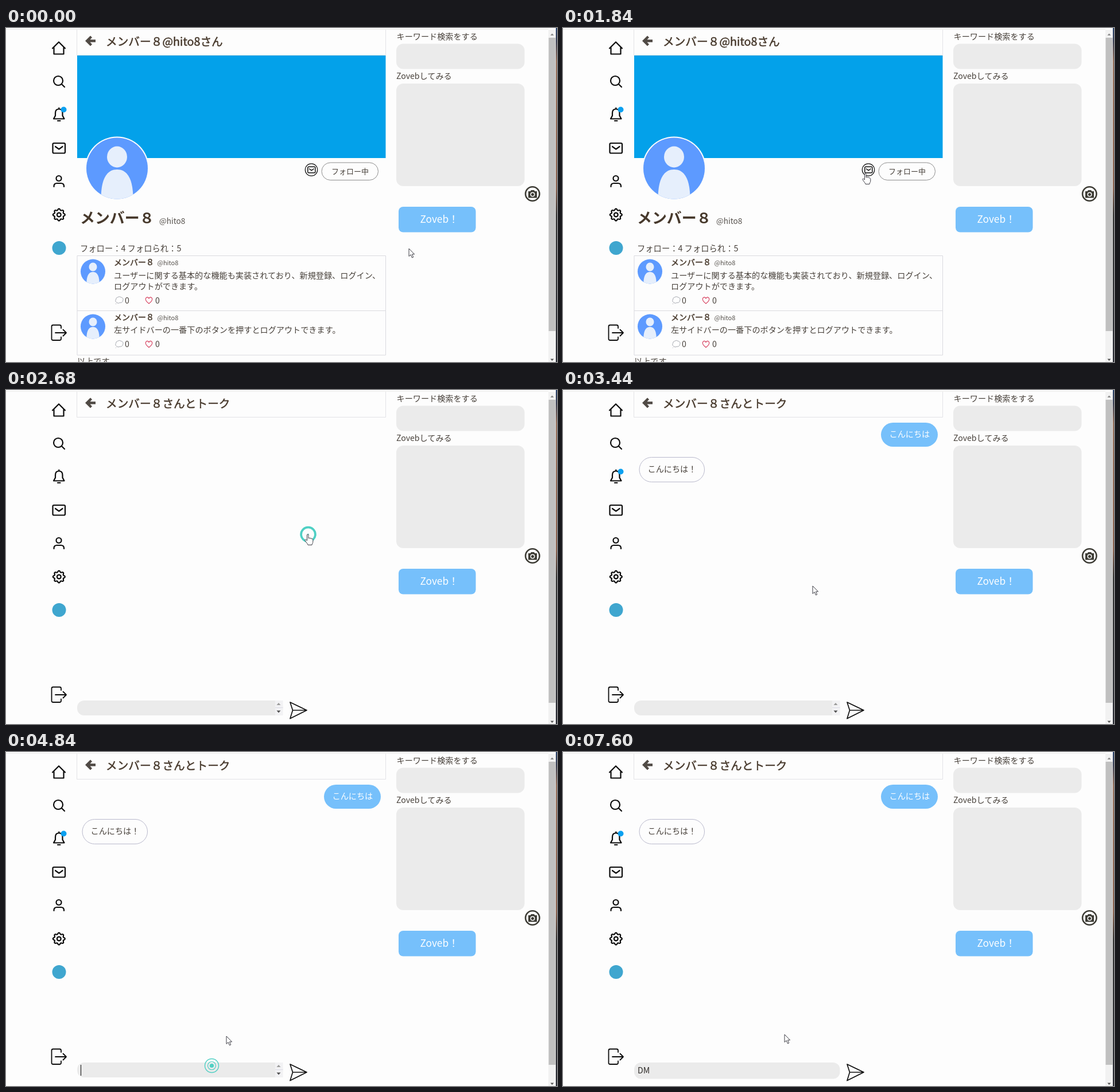
An HTML page for the animation above (8000 ms loop, 960x583 px).

```html
<!DOCTYPE html>
<html lang="ja">
<head>
<meta charset="utf-8">
<title>トーク</title>
<style>
html, body { margin: 0; width: 100%; height: 100%; overflow: hidden; background: #fdfdfd; }
svg { display: block; width: 100vw; height: 100vh; }
text { font-family: "Noto Sans CJK JP", "Noto Sans CJK", sans-serif; font-size: 14.15px; fill: #47403a; white-space: pre; }
.semi { fill: #47392c; stroke: #47392c; stroke-width: .5; }
.handle { fill: #55504b; }
.icon { fill: none; stroke: #0b0b0b; stroke-width: 2.2; stroke-linejoin: round; stroke-linecap: round; }
.thin { fill: none; stroke: #111; stroke-width: 1.5; stroke-linejoin: round; }
.line { fill: none; stroke: #dadadf; }
.field { fill: #ebebeb; }
</style>
</head>
<body>
<svg viewBox="0 0 960 583" preserveAspectRatio="none">
  <defs>
    <linearGradient id="edge" x2="0" y2="1">
      <stop offset="0" stop-color="#27416b"/><stop offset=".04" stop-color="#3a3f52"/>
      <stop offset=".1" stop-color="#96705c"/><stop offset=".48" stop-color="#8a6250"/>
      <stop offset=".56" stop-color="#333"/><stop offset="1" stop-color="#292b33"/>
    </linearGradient>
    <clipPath id="round"><circle r="53.5"/></clipPath>
    <g id="avatar">
      <circle r="53.5" fill="#5d9aff"/>
      <g fill="#e6effc" clip-path="url(#round)">
        <ellipse cy="-20" rx="17.5" ry="18.5"/>
        <path d="M-28 54C-28 24-21 2 0 2S28 24 28 54Z"/>
      </g>
    </g>
    <g id="counts">
      <path d="M4 4.500a4 4 0 0 1 3-4a5 5 0 0 1 6 0a4 4 0 0 1 3 6a4 4 0 0 1-5 3.500a5 5 0 0 1-6-.5a3.500 3.500 0 0 1-1-5ZM4.500 11.500l-1 1" fill="#fff" stroke="#a3a6ad" transform="translate(-1.500)"/>
      <text x="18" y="11">0</text>
      <path d="M60 11.500C54 7 54 4 54.500 2.500C55.500-.5 59-.2 60 2.500C61-.2 64.500-.5 65.500 2.500C66 4 66 7 60 11.500Z" fill="none" stroke="#d63d5c" stroke-width="1.100"/>
      <text x="71" y="11">0</text>
    </g>
  </defs>

  <rect width="960" height="583" fill="#fdfdfd"/>
  <path d="M0 2.500H945" stroke="#ececea"/>

  <g class="icon">
    <path d="M81 35.500L92 24.500L103 35.500M83.500 34V45.500H100.500V34"/>
    <circle cx="91" cy="92" r="8"/><path d="M97 98l5 5"/>
    <path d="M83 158.500H101.500L98.500 153V148.500C98.500 144 96 141.500 92.300 141.500S86 144 86 148.500V153ZM92.300 141V139.500M90 162h4.500"/>
    <rect x="81.500" y="201" width="21.500" height="17.500" rx="2"/><path d="M86 207l6.300 4.500L98.500 207"/>
    <circle cx="92" cy="262.500" r="4.500"/><path d="M83.500 277V276C83.500 272.500 86 271 89 271H95.500C98.500 271 101 272.500 101 276V277"/>
    <path id="gear" transform="translate(92.300 326)"/><circle cx="92.300" cy="326" r="3.400"/>
    <path stroke-width="1.800" d="M96 524V521a2.500 2.500 0 0 0-2.500-2.500H82a2.500 2.500 0 0 0-2.500 2.500V542.500a2.500 2.500 0 0 0 2.500 2.500H93.500a2.500 2.500 0 0 0 2.500-2.500V539.500M86 532H105M99.500 526.500L105 532L99.500 537.500"/>
  </g>
  <circle cx="92.500" cy="384" r="12" fill="#3fa6cf"/>
  <circle id="dot" cx="100.500" cy="142.500" r="5" fill="#0aa0f0"/>

  <path class="line" stroke-opacity=".75" d="M123.500 3V47.500H661.500V3"/>
  <path d="M138 22.500L147 13.500L150 16.500L146.500 20.200H156V24.800H146.500L150 28.500L147 31.500Z" fill="#504a45"/>

  <g id="profile">
    <text class="semi" x="174" y="31" font-size="19.700" style="font-size:19.7px">メンバー８@hito8さん</text>
    <rect x="124" y="48" width="537.500" height="179" fill="#03a1ea"/>
    <circle cx="193.500" cy="245" r="55.500" fill="#fdfdfd"/>
    <use href="#avatar" x="193.500" y="245"/>
    <circle class="thin" cx="532" cy="247.500" r="10.700" style="stroke-width:1.2"/>
    <rect class="thin" x="525.800" y="242.300" width="13" height="10.400" rx="1.500"/>
    <path class="thin" d="M528 245.500l4.300 3.200 4.300-3.200"/>
    <rect x="550" y="235" width="98.500" height="30.500" rx="15.200" fill="#fdfdfd" stroke="#8d8d8d"/>
    <text x="567" y="255" style="font-size:13px">フォロー中</text>
    <text class="semi" x="129" y="341" style="font-size:25.900px;font-weight:bold;stroke:none">メンバー８</text>
    <text class="handle" x="267" y="342" style="font-size:13.500px">@hito8</text>
    <text x="129" y="390" style="font-size:14.300px">フォロー：4 フォロられ：5</text>
    <path class="line" d="M124 397.500H661.500V571H124ZM124 493.500H661.500"/>
    <g id="posts"></g>
    <text x="124" y="587">以上です</text>
  </g>

  <g id="chat">
    <text class="semi" x="174" y="31" style="font-size:19.700px">メンバー８さんとトーク</text>
    <g id="messages">
      <rect x="554" y="57" width="99" height="42" rx="21" fill="#76c0fb"/>
      <text x="568.500" y="82" style="fill:#fff">こんにちは</text>
      <rect x="133" y="117.500" width="113.500" height="43" rx="21.500" fill="#fdfdfd" stroke="#b9b9cc"/>
      <text x="147.500" y="143">こんにちは！</text>
    </g>
    <rect id="input" class="field" x="124" y="542" width="358.500" height="26" rx="12"/>
    <g id="spin">
      <rect x="469" y="542" width="13.500" height="26" fill="#f2f2f4"/>
      <path d="M469 554.500h13.500" stroke="#dcdce6"/>
      <path d="M471.500 550h7l-3.500-4Z" fill="#9a9a9a"/><path d="M471.500 559.500h7l-3.500 4Z" fill="#505050"/>
    </g>
    <text id="typed" x="130" y="560.500" style="fill:#2c2926"></text>
    <path id="caret" d="M0 546V565" stroke="#222" stroke-width="1.200"/>
    <path class="thin" d="M495 545L524 559L495 573.500L499.500 559ZM499.500 559H524" style="stroke-width:1.7"/>
  </g>

  <text x="680.500" y="19.500">キーワード検索をする</text>
  <rect class="field" x="680" y="27.500" width="223.500" height="44" rx="12"/>
  <text x="680" y="89">Zovebしてみる</text>
  <rect class="field" x="680" y="97" width="223.500" height="179" rx="12"/>
  <circle cx="917.300" cy="289.500" r="12.200" fill="none" stroke="#3d3c35" stroke-width="2.600"/>
  <path d="M910 285H913.500L915 283H920L921.500 285H925V296.500H910Z" fill="#3d3c35"/>
  <circle cx="917.500" cy="290.500" r="3.300" fill="none" stroke="#fdfdfd" stroke-width="1.500"/>
  <rect x="684" y="312" width="134.500" height="44.500" rx="8" fill="#76c0fb"/>
  <text x="721.500" y="340" style="font-size:17.300px;fill:#fff">Zoveb！</text>

  <rect x="945" y="3" width="13" height="580" fill="#f2f2f2"/>
  <rect id="thumb" x="945.500" y="17" width="12" fill="#c0c0c0"/>
  <path d="M948.500 13h6l-3-3.500Z" fill="#888"/><path d="M948.500 577.500h6l-3 3.500Z" fill="#555"/>
  <rect x="958" width="2" height="583" fill="url(#edge)"/>

  <g id="ring" fill="none" stroke="#4fd0c4">
    <circle id="halo" stroke="#fff"/>
    <circle id="outer"/><circle id="inner"/><circle id="core" fill="#4fd0c4" stroke="none"/>
  </g>
  <g id="cursor" fill="#fff" stroke="#3d3d45" stroke-linejoin="round">
    <path id="arrow" d="M0 0V13.500L3.200 10.700L5.500 16L7.700 15L5.500 9.900H9.600Z"/>
    <path id="hand" d="M-1.500 11V1C-1.500-.5 1-.5 1 1V7C2-.2+6 3.800 5.800 3.800 7.200C5 6.300 6.500 6.300 6.500 8C7.500 7.500 8.800 7.800 8.800 9.500V13C8.800 15.500 7 16 7 18.500H0C0 16.500-3 14.500-5 10.500C-5.500 9-3.500 8.500-2.700 9.700Z"/>
    <path id="beam" d="M-3-7H-1L0-6L1-7H3M0-6V6M-3 7H-1L0 6L1 7H3" fill="none"/>
  </g>
</svg>
<script>
const LOOP = 8000, OPEN = 2680, LOAD = 3040, FOCUS = 3900, TYPE_D = 6080, TYPE_M = 7080;
const $ = id => document.getElementById(id);
const set = (id, attrs) => { for (const k in attrs) $(id).setAttribute(k, attrs[k]); };
const show = (id, on) => { $(id).style.display = on ? "" : "none"; };
const clamp = v => Math.max(0, Math.min(1, v));
const mix = (a, b, p) => a + (b - a) * p;
const ease = p => p * p * (3 - 2 * p);

// Wavy cog outline
let cog = "";
for (let i = 0; i < 96; i++) {
  const a = i / 96 * Math.PI * 2, r = 9.3 + 1.2 * Math.cos(8 * a);
  cog += (i ? "L" : "M") + (r * Math.cos(a)).toFixed(2) + " " + (r * Math.sin(a)).toFixed(2);
}
set("gear", { d: cog + "Z" });
set("hand", { d: "M-1.5 11V1C-1.5-.5 1-.5 1 1V7C2 6 3.800 5.800 3.800 7.200C5 6.300 6.500 6.300 6.500 8C7.500 7.500 8.800 7.800 8.800 9.500V13C8.800 15.500 7 16 7 18.500H0C0 16.500-3 14.500-5 10.500C-5.500 9-3.500 8.500-2.700 9.700Z" });

const posts = [
  [397, ["ユーザーに関する基本的な機能も実装されており、新規登録、ログイン、", "ログアウトができます。"]],
  [493, ["左サイドバーの一番下のボタンを押すとログアウトできます。"]]
];
$("posts").innerHTML = posts.map(([y, lines]) => {
  const first = y === 397 ? 40 : 39, foot = y + first + 33 + (lines.length - 1) * 18.5 - 19;
  return `<use href="#avatar" transform="translate(151.500 ${y + 28}) scale(.402)"/>
    <text class="semi" x="188" y="${y + 17}" style="font-size:14px">メンバー８</text>
    <text class="handle" x="263.500" y="${y + 17}" style="font-size:11px">@hito8</text>` +
    lines.map((s, i) => `<text x="188" y="${y + first + i * 18.5}">${s}</text>`).join("") +
    `<use href="#counts" x="189" y="${foot}"/>`;
}).join("");

// Pointer stops: time, x, y
const stops = [
  [0, 702, 385], [600, 702, 385], [1400, 526, 260], [1560, 526, 260], [1840, 527, 254],
  [2120, 526, 252], [2720, 526, 252], [3440, 435, 342], [3500, 435, 342], [3880, 359, 547],
  [4620, 359, 547], [4840, 384, 496], [5040, 386, 493], [LOOP, 386, 493]
];
function pointer(t) {
  const i = stops.findIndex((s, n) => n && t <= s[0]);
  const a = stops[i - 1], b = stops[i], p = ease((t - a[0]) / (b[0] - a[0]));
  return [mix(a[1], b[1], p), mix(a[2], b[2], p)];
}

// Ring closes in on press, then splits and spreads on release
function click(t, down, up, x, y) {
  if (t < down || t >= up + 640) return false;
  set("ring", { transform: `translate(${x} ${y})` });
  if (t < up + 40) {
    const p = ease(clamp((t - down) / 400));
    set("ring", { opacity: p });
    set("halo", { r: mix(17, 14.8, p), "stroke-width": 2.5 });
    set("outer", { r: mix(16, 12.4, p), "stroke-width": 3.8 });
    set("inner", { r: 0 });
    set("core", { r: 1.2 });
  } else {
    const p = clamp((t - up) / 200), q = clamp((t - up - 200) / 300);
    set("ring", { opacity: 1 - q * .97 });
    set("halo", { r: 0 });
    set("outer", { r: mix(12, 20, q), "stroke-width": mix(3.8, 1.4, p) });
    set("inner", { r: mix(2, 7, p) + 7 * q, "stroke-width": 1.2 });
    set("core", { r: mix(1.2, 3.6, p) });
  }
  return true;
}

function draw(t) {
  const chat = t >= OPEN, typing = t >= TYPE_D;
  show("profile", !chat);
  show("chat", chat);
  show("messages", t >= LOAD);
  show("dot", !chat || t >= LOAD);
  set("thumb", { height: chat ? 529 : 512 });
  set("input", { height: typing ? 28.5 : 26 });
  show("spin", !typing);
  $("typed").textContent = t >= TYPE_M ? "DM" : typing ? "D" : "";

  const lit = [[FOCUS, 5320], [5600, 6720], [TYPE_M, 7600]].some(([a, b]) => t >= a && t < b);
  show("caret", lit);
  set("caret", { transform: `translate(${t >= TYPE_M ? 154.5 : typing ? 140.5 : 130.5})` });

  const [x, y] = pointer(t);
  const hand = t >= 1640 && t < 2740, beam = t >= 3860 && t < 4700;
  set("cursor", { transform: `translate(${x.toFixed(2)} ${y.toFixed(2)})` });
  show("hand", hand);
  show("beam", beam);
  show("arrow", !hand && !beam);
  show("ring", click(t, 2120, OPEN, 526.5, 252) || click(t, FOCUS, 4640, 358.5, 547.5));
}

const start = performance.now();
function tick() {
  draw((performance.now() - start) % LOOP);
  requestAnimationFrame(tick);
}
draw(0);
requestAnimationFrame(tick);
</script>
</body>
</html>
```
